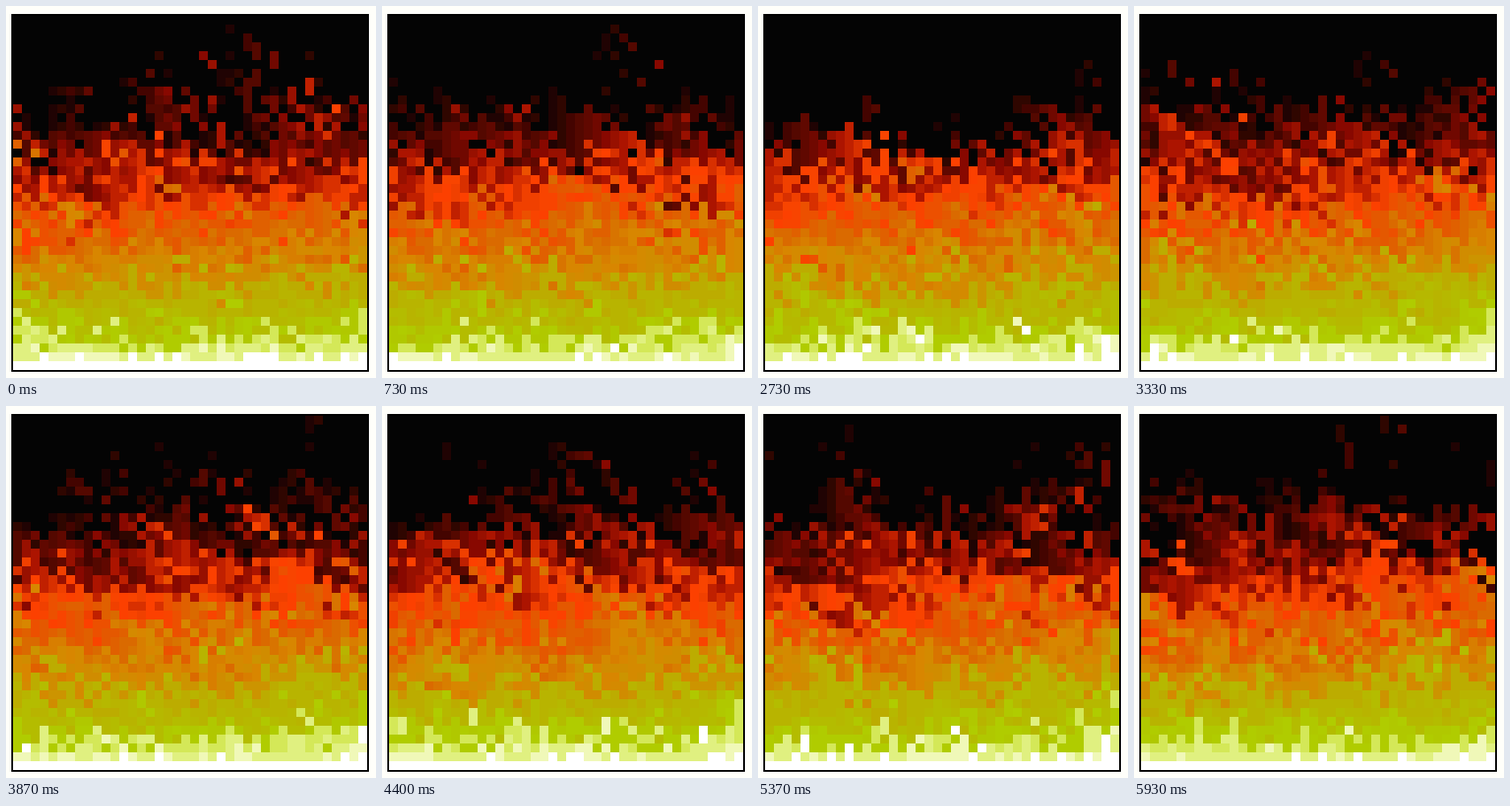
An HTML page with a canvas for the animation above (5.96 s loop, 418 px wide and 420 px high).

```html
<!DOCTYPE html>
<html lang="en">
<head>
<meta charset="utf-8">
<title>Pixel fire</title>
<style>
  html, body { margin: 0; width: 100%; height: 100%; overflow: hidden; background: #fffffa; }
  canvas { display: block; }
</style>
</head>
<body>
<canvas id="stage" width="418" height="420"></canvas>
<script>
const SIZE = 40, CELL = 10, LEFT = 8, TOP = 11;
const LOOP = 5960, FRAME = 100 / 3, STEP = 50;
const TICKS = Math.ceil(LOOP / STEP), RESTART = 18, WARMUP = 100;

// Colours from cold to hot
const palette = `040404 200303 2f0600 440400 540800 600800 700800 880800 981000
  ac1400 c02000 d83000 f04000 fc4000 f84400 ec5000 e45800 e06000 da6a00 d87400
  d87e00 d88600 d48a00 d08c00 cc9400 bcac00 bcac00 b8b400 b8b400 b6b800 b4bc00
  b0c800 b0cc00 d4e858 e0f080 f0f8b8 ffffff`.split(/\s+/).map(c => '#' + c);
const HOTTEST = palette.length - 1;

let seed = 20719;
function random() {
  seed = (seed + 0x6D2B79F5) | 0;
  let n = Math.imul(seed ^ (seed >>> 15), 1 | seed);
  n = (n + Math.imul(n ^ (n >>> 7), 61 | n)) ^ n;
  return ((n ^ (n >>> 14)) >>> 0) / 4294967296;
}

function ignite() {
  return new Uint8Array(SIZE * SIZE).fill(HOTTEST, SIZE * (SIZE - 1));
}

// Each cell takes the heat below it, cools a little and drifts left
function spread(fire) {
  for (let col = 0; col < SIZE; col++) {
    for (let row = 0; row < SIZE - 1; row++) {
      const cell = row * SIZE + col;
      const decay = Math.floor(random() * 3);
      const target = cell - decay;
      if (target >= 0) fire[target] = Math.max(0, fire[cell + SIZE] - decay);
    }
  }
}

function simulate() {
  const states = [];
  let fire = ignite();
  for (let i = 0; i < WARMUP; i++) spread(fire);
  for (let tick = 0; tick < TICKS; tick++) {
    if (tick === RESTART) fire = ignite();
    else spread(fire);
    states.push(fire.slice());
  }
  return states;
}

const ctx = document.getElementById('stage').getContext('2d');
const states = simulate();
const start = performance.now();
let shown = -1;

function draw(fire) {
  ctx.fillStyle = '#fffffa';
  ctx.fillRect(0, 0, 418, 420);
  ctx.fillStyle = '#000';
  ctx.fillRect(LEFT - 2, TOP - 2, SIZE * CELL + 4, SIZE * CELL + 4);
  fire.forEach((heat, i) => {
    ctx.fillStyle = palette[heat];
    ctx.fillRect(LEFT + i % SIZE * CELL, TOP + Math.floor(i / SIZE) * CELL, CELL, CELL);
  });
}

function render() {
  const time = (performance.now() - start) % LOOP;
  // The fire steps every 50 ms but is seen at 30 frames a second
  const frame = Math.floor((Math.floor(time / 10) * 10 + 5) / FRAME);
  const tick = Math.min(TICKS - 1, Math.floor(frame * FRAME / STEP + 0.01));
  if (tick !== shown) draw(states[shown = tick]);
  requestAnimationFrame(render);
}
render();
</script>
</body>
</html>
```
